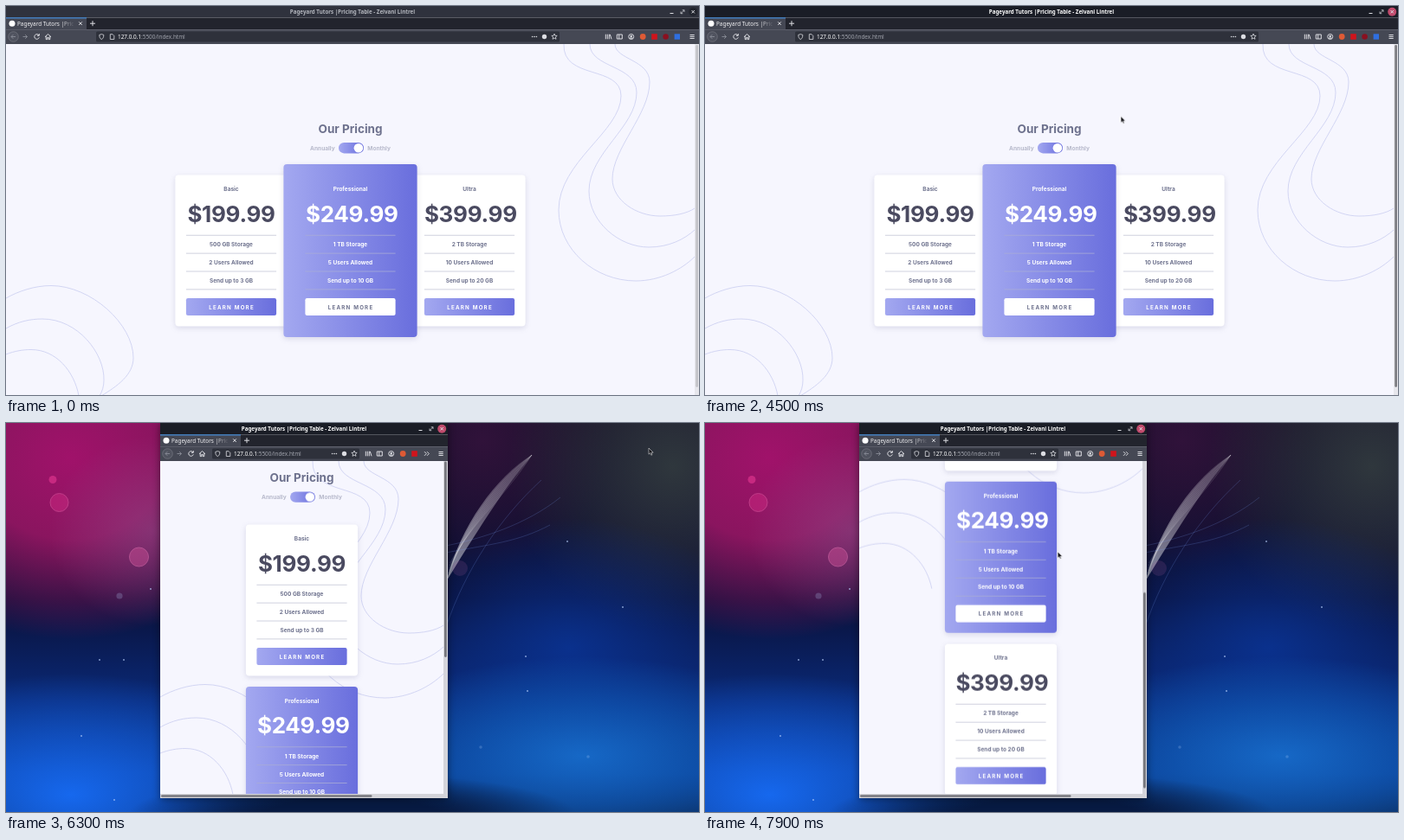
An HTML page that plays this animation: 800x450 px, repeating every 8 s.

```html
<!DOCTYPE html>
<html lang="en">
<head>
<meta charset="utf-8">
<title>Pricing Table</title>
<style>
html, body { margin: 0; width: 100%; height: 100%; overflow: hidden; }
#stage {
  position: relative; width: 800px; height: 450px; overflow: hidden;
  background:
    radial-gradient(ellipse 260px 50px at 400px 455px, #071a42 40%, transparent),
    radial-gradient(ellipse 120px 110px at 170px 125px, rgba(150, 75, 140, .55), transparent),
    radial-gradient(ellipse 250px 210px at 75px 40px, #a0126a, #8a155f 45%, transparent),
    radial-gradient(ellipse 270px 140px at 75px 430px, #1668ee, rgba(18, 86, 205, .75) 50%, transparent),
    radial-gradient(ellipse 270px 115px at 665px 385px, #1668c6, rgba(16, 88, 180, .7) 50%, transparent),
    radial-gradient(ellipse 220px 150px at 650px 260px, rgba(10, 52, 150, .85), transparent),
    radial-gradient(ellipse 190px 190px at 770px 50px, #2f373d, transparent),
    radial-gradient(ellipse 150px 150px at 550px 20px, #30123a, transparent),
    linear-gradient(#170f28, #0a1038 45%, #0a2a78 72%, #0b3c90 90%, #0a2856);
}
svg { display: block; position: absolute; left: 0; top: 0; }
text { font-family: Inter, sans-serif; font-weight: 700; white-space: pre; }
.ui { font-family: "Noto Sans", sans-serif; font-weight: 400; }
.ui.bold { font-weight: 700; }
.price { letter-spacing: -.3px; }
.cta { letter-spacing: 1.2px; }
.shadow { filter: drop-shadow(0 2px 3px rgba(60, 60, 120, .16)); }
.line { fill: none; stroke: #cacdf0; stroke-width: .8; }
.icon { fill: none; stroke: #dcdde2; stroke-width: 1; }

.big, .bar, .caption, .close, .thumb, .yr, .mo, .knob, .hover,
.scroll, .slide, .cursor, .arrow, .hand { animation: 8s step-end infinite; }
.big { animation-name: big; }
.bar { animation-name: bar; }
.caption { animation-name: caption; }
.close { animation-name: close; }
.thumb { animation-name: thumb; }
.yr { animation-name: yr; }
.mo { animation-name: mo; }
.knob { animation-name: knob; }
.hover { animation-name: hover; }
.scroll { animation-name: scroll; }
.slide { animation-name: slide; }
.cursor { animation-name: cursor; }
.arrow { animation-name: arrow; }
.hand { animation-name: hand; }

@keyframes big { 0% { opacity: 1 } 72.5%, 100% { opacity: 0 } }
/* window gains focus */
@keyframes bar {
  0% { fill: #2f323d } 36.25% { fill: #2f323d; animation-timing-function: steps(2, start) }
  38.75%, 100% { fill: #1a1d26 }
}
@keyframes caption {
  0% { fill: #b4b7be } 36.25% { fill: #b4b7be; animation-timing-function: steps(2, start) }
  38.75%, 100% { fill: #fff }
}
@keyframes close {
  0% { fill: #22252e } 36.25% { fill: #22252e; animation-timing-function: steps(2, start) }
  38.75%, 100% { fill: #c04a6c }
}
@keyframes thumb {
  0% { fill: #c3c3c9 } 36.25% { fill: #c3c3c9; animation-timing-function: steps(2, start) }
  38.75%, 100% { fill: #7d7d83 }
}
/* billing switch */
@keyframes yr { 0%, 48.75%, 100% { opacity: 1 } 38.75% { opacity: 0 } }
@keyframes mo { 0%, 48.75%, 100% { opacity: 0 } 38.75% { opacity: 1 } }
@keyframes knob {
  0% { transform: none }
  38.75% { transform: translateX(0); animation-timing-function: steps(3, start) }
  42.5% { transform: translateX(-17px) }
  48.75% { transform: translateX(-17px); animation-timing-function: steps(3, start) }
  52.5%, 100% { transform: translateX(0) }
}
@keyframes hover { 0%, 72.5%, 100% { opacity: 0 } 68.75% { opacity: 1 } }
/* page and its scrollbar */
@keyframes scroll {
  0% { transform: translateY(0) }
  87.5% { transform: translateY(0); animation-timing-function: steps(5, start) }
  93.75% { transform: translateY(-119px); animation-timing-function: steps(3, start) }
  97.5%, 100% { transform: translateY(-237.3px) }
}
@keyframes slide {
  0% { transform: translateY(0) }
  87.5% { transform: translateY(0); animation-timing-function: steps(5, start) }
  93.75% { transform: translateY(76.5px); animation-timing-function: steps(3, start) }
  97.5%, 100% { transform: translateY(151.5px) }
}
@keyframes cursor {
  0% { transform: translate(676px, 97px); opacity: 0 }
  17.5% { transform: translate(676px, 97px); opacity: 1 }
  18.75% { transform: translate(676px, 97px); animation-timing-function: steps(2, start) }
  21.25% { transform: translate(520px, 86px); animation-timing-function: steps(2, start) }
  23.75% { transform: translate(397px, 126px) }
  25% { transform: translate(397px, 126px); animation-timing-function: steps(2, start) }
  27.5% { transform: translate(405px, 142px); animation-timing-function: steps(2, start) }
  30% { transform: translate(397px, 157px) }
  31.25% { transform: translate(397px, 163px) }
  55% { transform: translate(397px, 163px); animation-timing-function: steps(9, start) }
  66.25% { transform: translate(771px, 4px); animation-timing-function: steps(2, start) }
  68.75% { transform: translate(788px, 6px); animation-timing-function: steps(2, start) }
  71.25% { transform: translate(781px, 8px) }
  76.25% { transform: translate(790px, 10px) }
  77.5% { transform: translate(790px, 10px); animation-timing-function: steps(2, start) }
  80% { transform: translate(742px, 29px); animation-timing-function: steps(2, start) }
  82.5% { transform: translate(610px, 140px); animation-timing-function: steps(2, start) }
  85% { transform: translate(470px, 236px); animation-timing-function: steps(2, start) }
  87.5% { transform: translate(405.7px, 149.5px) }
  98.75%, 100% { transform: translate(407.2px, 149px); opacity: 1 }
}
@keyframes arrow { 0%, 55%, 100% { opacity: 1 } 31.25% { opacity: 0 } }
@keyframes hand { 0%, 55%, 100% { opacity: 0 } 31.25% { opacity: 1 } }
</style>
</head>
<body>
<div id="stage"></div>
<script>
const INK = '#6d718d', DARK = '#4a4a60', MUTED = '#b7b9cb', PAGE = '#f6f6fe';
const SITE = 'Pageyard Tutors |Pric', CAPTION = SITE + 'ing Table - Zelvani Lintrel';

const rect = (x, y, w, h, fill, more = '') =>
  `<rect x="${x}" y="${y}" width="${w}" height="${h}" fill="${fill}" ${more}/>`;
const circle = (x, y, r, fill, more = '') =>
  `<circle cx="${x}" cy="${y}" r="${r}" fill="${fill}" ${more}/>`;
const path = (d, more = 'class="icon"') => `<path d="${d}" ${more}/>`;
const group = (more, ...parts) => `<g ${more}>${parts.join('')}</g>`;
const at = (x, y) => `transform="translate(${x} ${y})"`;
// y is the middle of the capitals
const label = (x, y, s, size, fill, more = '') =>
  `<text x="${x}" y="${y + size * .36}" font-size="${size}" fill="${fill}" ${more}>${s}</text>`;
const mid = (x, y, s, size, fill, more = '') =>
  label(x, y, s, size, fill, 'text-anchor="middle" ' + more);

const plans = [
  { name: 'Basic', yr: '$199.99', mo: '$19.99', rows: ['500 GB Storage', '2 Users Allowed', 'Send up to 3 GB'], nudge: 0 },
  { name: 'Professional', yr: '$249.99', mo: '$24.99', rows: ['1 TB Storage', '5 Users Allowed', 'Send up to 10 GB'], nudge: 1.8, pro: true },
  { name: 'Ultra', yr: '$399.99', mo: '$39.99', rows: ['2 TB Storage', '10 Users Allowed', 'Send up to 20 GB'], nudge: 1.3 }
];

function card(plan, cx, top, grow = 0) {
  const { pro } = plan, ink = pro ? '#fff' : INK, num = pro ? '#fff' : DARK;
  let s = rect(-64.6 - grow, -grow, 129.2 + 2 * grow, 175 + 2 * grow, pro ? 'url(#grad)' : '#fff', 'rx="4" class="shadow"');
  s += mid(0, 16.3, plan.name, 6.5, ink);
  s += mid(plan.nudge, 45, plan.yr, 26, num, 'class="price yr"');
  s += mid(0, 45, plan.mo, 26, num, 'class="price mo"');
  for (let i = 0; i < 4; i++) s += rect(-52.1, 69.3 + i * 20.9, 104.2, .8, pro ? '#a9acd6' : '#c3c5d6');
  plan.rows.forEach((row, i) => s += mid(0, 80.2 + i * 20.9, row, 6.5, ink));
  s += rect(-52.1, 142.6, 104.2, 20, pro ? '#fff' : 'url(#grad)', 'rx="2.1"');
  s += mid(.6, 152.8, 'LEARN MORE', 6.2, pro ? INK : '#fff', 'class="cta"');
  return group(at(cx, top), s);
}

const header = (dx, dy) => group(at(dx, dy),
  mid(397.5, 142, 'Our Pricing', 13.5, INK),
  label(351, 164.3, 'Annually', 6.6, MUTED),
  label(417.3, 164.3, 'Monthly', 6.6, MUTED),
  rect(384, 158, 29, 12.4, 'url(#grad)', 'rx="6.2"'),
  circle(406.9, 164.2, 5.3, '#fff', 'class="knob"'));

const topLines = dx => group(`class="line" ${at(dx, 0)}`, ...[
  'M703 44C703 62 743 62 743 88C743 125 700 165 700 200C700 225 728 243 755 243C772 243 786 240 795 234',
  'M674 44C674 72 728 68 728 100C728 140 673 170 673 214C673 250 708 279 742 279C765 279 783 270 795 259',
  'M644 44C642 86 710 68 710 104C710 145 638 180 638 236C638 282 680 318 727 318C755 318 780 305 795 290'
].map(d => path(d, '')));

const lowLines = (dx, dy) => group(`class="line" clip-path="url(#low)" ${at(dx, dy)}`, ...[
  'M0 338C14 330 33 323.500 52 323.500C98 323.500 147 368 147 407C147 427 128 440 110 451',
  'M0 373C14 365 28 362 42 362C83 362 114 402 113 433C113 440 111 446 108 451',
  'M0 403C10 399 20 397.500 29 397.500C58 397.500 79 423 84 451'
].map(d => path(d, '')));

// browser frame: left edge, width, address field from a to b
function frame(x, w, a, b) {
  const r = x + w, y = 35.5, wide = w > 500;
  let s = rect(x, 0, w, 13.5, '#1a1d26', 'class="bar"');
  s += mid(x + w / 2, 6.7, CAPTION, 6.2, '#fff', 'class="ui bold caption"');
  s += path(`M${r - 33.5} 8.500h4`);
  if (wide) s += circle(r - 19, 6.7, 5, '#5a5d69', 'class="hover"');
  s += path(`M${r - 21} 8.700l4-4m-2.300 0h2.300v2.300m-4-.6v2.300h2.300`, 'class="icon" style="stroke-width:.7"');
  s += circle(r - 6.8, 6.7, 5, '#c04a6c', 'class="close"');
  s += path(`M${r - 8.5} 5l3.400 3.400m0-3.400l-3.400 3.400`);

  s += rect(x, 13.5, w, 13.7, '#22242d') + rect(x, 13.5, 93, 13.7, '#454854') + rect(x, 13.3, 93, 1.1, '#3f8fe0');
  s += circle(x + 7, 20.2, 3.5, '#fff');
  s += label(x + 13, 20.2, SITE, 6.4, '#f2f2f4', 'class="ui"');
  s += rect(x + 64, 15, 18, 11.5, 'url(#fade)');
  s += path(`M${x + 84.2} 18.400l3.600 3.600m0-3.600l-3.600 3.600M${x + 97} 20.200h6m-3-3v6`);

  s += rect(x, 27.2, w, 16.8, '#454854');
  s += circle(x + 8.5, y, 5.8, '#50535f', 'stroke="#7c7f89" stroke-width=".6"');
  s += path(`M${x + 11} ${y}h-5m2.300-2.300l-2.300 2.300l2.300 2.300M${x + 19.500} ${y}h5m-2.300-2.300l2.300 2.300l-2.300 2.300`,
    'fill="none" stroke="#8b8e98" stroke-width=".9"');
  s += path(`M${x + 38} ${y - 1.500}a2.800 2.800 0 1 0 .3 2.300m0-4.300v2.300h-2.300`);
  s += path(`M${x + 45} ${y + .3}l3.500-3.300l3.500 3.300m-5.800-1v3.800h1.600v-2.200h1.400v2.200h1.600v-3.800`);

  s += rect(a, 29.4, b - a, 12.2, '#2e313b', 'rx="1.5"');
  s += path(`M${a + 6.300} 32.600l2.500.8c0 2.600-.6 4.200-2.500 5.200c-1.900-1-2.500-2.600-2.500-5.200zM${a + 16.300} 32.700h2.800l1.700 1.700v4.100h-4.500z`,
    'class="icon" style="stroke-width:.8"');
  s += label(a + 25, y, '127.0.0.1<tspan fill="#a0a3ac">:5500/index.html</tspan>', 6.4, '#fff', 'class="ui"');
  [-31.4, -29, -26.6].forEach(d => s += circle(b + d, y, .8, '#dcdde2'));
  s += circle(b - 17.5, y, 2.7, '#dcdde2');
  let star = '';
  for (let i = 0; i < 10; i++) {
    const q = i * Math.PI / 5, k = i % 2 ? 1.5 : 3.4;
    star += (i ? 'L' : 'M') + (b - 6 + k * Math.sin(q)).toFixed(1) + ' ' + (y - k * Math.cos(q)).toFixed(1);
  }
  s += path(star + 'z', 'class="icon" style="stroke-width:.8"');

  const t = wide ? 695 : b + 10;
  s += path(`M${t - 2.700} 32.700v5.600m2-5.600v5.600m2-5.600v5.600m1-5.400l1.700 5.400`);
  s += path(`M${t + 10.300} 33h6v5h-6zm2.400 0v5`);
  s += circle(t + 26.7, y, 3, 'none', 'class="icon"') + circle(t + 26.7, y - .6, 1.2, '#dcdde2') + rect(t + 25, y + 1, 3.4, 1.2, '#dcdde2');
  s += circle(t + 40.2, y, 3.4, '#de5a35');
  s += rect(t + 50.2, y - 3.3, 6.6, 6.6, '#d0141c');
  if (wide) s += circle(t + 66.6, y, 3.3, '#8a1020') + rect(t + 76.6, y - 3.2, 6.4, 6.4, '#2f6fe0');
  else s += path(`M${t + 65} 33.200l2.300 2.300l-2.300 2.300m3-4.600l2.300 2.300l-2.300 2.300`);
  return s + path(`M${r - 10.500} 33.500h5.200m-5.200 2h5.200m-5.200 2h5.200`);
}

const big = group('class="big"',
  rect(0, 0, 800, 450, PAGE),
  topLines(0), lowLines(0, 0), header(0, 0),
  card(plans[0], 260, 195.5), card(plans[2], 535, 195.5), card(plans[1], 397.5, 195.5, 12.5),
  rect(795, 44, 5, 406, '#e6e6ec'),
  rect(796.2, 45, 2.8, 396, '#7d7d83', 'rx="1.4" class="thumb"'),
  frame(0, 800, 104, 639));

const small = group('',
  rect(178, 0, 332, 434, PAGE, 'style="filter:drop-shadow(0 1px 4px rgba(0,0,0,.5))"'),
  group('clip-path="url(#view)"', group('class="scroll"',
    topLines(-290), lowLines(178, -21), header(-56, -78.6),
    ...plans.map((p, i) => card(p, 341.5, 117.5 + i * 187.6)))),
  rect(505, 44, 5, 390, '#d4d4da') + rect(178, 429, 332, 5, '#d4d4da'),
  rect(506, 44.5, 2.8, 226.5, '#77777d', 'rx="1.4" class="slide"'),
  rect(179, 430.2, 243.5, 2.6, '#77777d', 'rx="1.3"'),
  frame(178, 332, 238, 408));

const specks = [[131, 200, 4], [136, 274, 1], [87, 362, 1], [125, 436, 1], [602, 310, 1], [712, 213, 1],
  [648, 137, 1], [672, 386, 2], [548, 375, 2], [108, 274, 1], [600, 270, 1], [167, 192, 1]];

// strands of the wisp fan out between its two ends
const strands = Array.from({ length: 7 }, (_, i) =>
  `M${510 + i * .4} ${180 - i * 3}C${524 + i * 3} ${128 - i * 3} ${562 + i * 2} ${70 + i * 3} 607 37`).join('');

const sky = group('',
  circle(54, 65.5, 4.5, '#e0358f', 'opacity=".65"'),
  circle(61.5, 92, 10.5, '#d62c86', 'opacity=".45" stroke="#f06ab0"'),
  circle(153.5, 155, 11, '#c04a90', 'opacity=".55" stroke="#e070b0"'),
  ...specks.map(([x, y, r]) => circle(x, y, r * .9, '#bcd4ff', `opacity="${r > 1 ? .22 : .75}"`)),
  path('M509 182C524 120 566 62 607 37C578 72 552 112 509 182Z', 'fill="url(#wisp)"'),
  path(strands, 'fill="none" stroke="#fff" stroke-opacity=".2" stroke-width=".7"'),
  path('M508 142C548 134 600 118 640 86M508 150C560 140 590 138 628 118M508 236C530 170 570 110 618 66',
    'fill="none" stroke="#7fa4ff" stroke-opacity=".25" stroke-width=".8"'),
  circle(524, 168, 9, '#a05a9a', 'opacity=".18"'));

const cursor = group('class="cursor"',
  path('M0 0V7.200L1.700 5.700L2.800 8.200L4 7.700L2.900 5.200H5.200Z', 'class="arrow" fill="#14141a" stroke="#fff" stroke-width=".5"'),
  path('M1.300.8q.7-.9 1.300 0v2.400l2.800.7q.6.300.4 1.200l-.6 2.700h-3.200l-2-2.600q0-1 1.300-.4z',
    'class="hand" fill="#14141a" stroke="#fff" stroke-width=".3"'));

document.getElementById('stage').innerHTML = `<svg width="800" height="450" viewBox="0 0 800 450">
  <defs>
    <linearGradient id="grad"><stop stop-color="#a3a8f0"/><stop offset="1" stop-color="#696edd"/></linearGradient>
    <linearGradient id="fade"><stop stop-color="#454854" stop-opacity="0"/><stop offset=".85" stop-color="#454854"/></linearGradient>
    <linearGradient id="wisp" x1="0" y1="1" x2="1" y2="0"><stop stop-color="#fff" stop-opacity=".5"/><stop offset="1" stop-color="#fff" stop-opacity=".12"/></linearGradient>
    <clipPath id="view"><rect x="178" y="44" width="327" height="385"/></clipPath>
    <clipPath id="low"><rect y="300" width="200" height="150"/></clipPath>
  </defs>${sky}${small}${big}${cursor}</svg>`;
</script>
</body>
</html>
```
